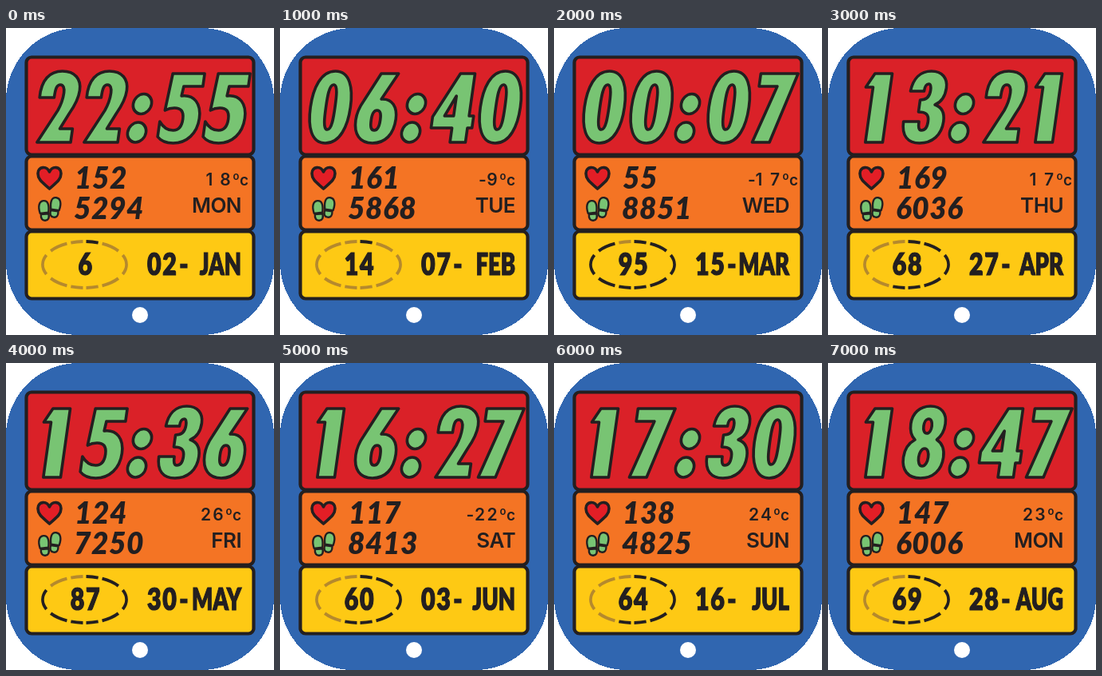
An HTML page that plays this animation: 336x384 px, repeating every 8000 ms.

```html
<!DOCTYPE html>
<html lang="en">
<head>
<meta charset="utf-8">
<title>Watch face</title>
<style>
  html, body { margin: 0; width: 100%; height: 100%; overflow: hidden; background: #fff; }
  svg { display: block; width: 336px; height: 384px; }
  .line { stroke: #231f20; stroke-width: 3.6; stroke-linejoin: round; }
  .panel { stroke-width: 4.2; }
  .green { fill: #78c473; }
  text { fill: #231f20; white-space: pre; }
  .count { font: italic 900 37px Lato, sans-serif; letter-spacing: .5px; }
  .date { font: 900 37px Lato, sans-serif; stroke: #231f20; stroke-width: 1.2; }
  .num { letter-spacing: 2px; }
  .day { font: 600 26px Inter, sans-serif; letter-spacing: -.6px; text-anchor: end; }
  .temp { font: 600 21px Inter, sans-serif; text-anchor: middle; }
  .ring { fill: none; stroke-width: 3.8; }
</style>
</head>
<body>
<svg viewBox="0 0 336 384" xmlns="http://www.w3.org/2000/svg">
  <rect width="336" height="384" rx="91" fill="#3066b0" shape-rendering="crispEdges"/>
  <g class="line panel">
    <rect x="25.5" y="36.5" width="285" height="122" rx="6.500" fill="#da2128"/>
    <rect x="25.5" y="160.5" width="285" height="92" rx="6.500" fill="#f47424"/>
    <rect x="25.5" y="254.5" width="285" height="84" rx="6.500" fill="#fec914"/>
  </g>

  <g id="clock" class="line green" fill-rule="evenodd">
    <ellipse rx="11.500" ry="12.500" transform="translate(171 95) skewX(-8)"/>
    <ellipse rx="11.500" ry="12.500" transform="translate(164 130.500) skewX(-8)"/>
  </g>

  <path class="line" fill="#e31e26"
    d="M54.500 201C47 194 40 190 40 182C40 173 51 172 54.500 180C58 172 69 173 69 182C69 190 62 194 54.500 201Z"/>
  <defs>
    <g id="foot">
      <path d="M-6 4C-8 -5 -6 -12 0 -12C7 -12 7 -4 5 4Z"/>
      <path d="M-5 5.500H5C6 11 4 14 0 14C-4 14 -6 11 -5 5.500Z"/>
    </g>
  </defs>
  <g class="line green" style="stroke-width:2.5">
    <use href="#foot" transform="translate(48 227.500) rotate(-6) scale(.95)"/>
    <use href="#foot" transform="translate(61.500 223.500) rotate(8) scale(-.95 .95)"/>
  </g>

  <text id="pulse" class="count" x="86" y="201"/>
  <text id="steps" class="count" x="85" y="239"/>

  <g id="temp" class="temp">
    <text id="minus" y="197">-</text>
    <text id="tens" y="197"/>
    <text id="ones" y="197"/>
    <g id="unit">
      <text x="-15.500" y="190" style="font-size:13px">o</text>
      <text x="-5.500" y="197" style="font-size:19px">c</text>
    </g>
  </g>
  <text id="day" class="day" x="295" y="231"/>

  <g id="rings"></g>
  <text id="level" class="date num" text-anchor="middle" transform="translate(100 309) scale(.82 1)"/>
  <text id="date" class="date num" transform="translate(177 309) scale(.82 1)"/>
  <text class="date" text-anchor="middle" transform="translate(223 309) scale(.82 1)">-</text>
  <text id="month" class="date" text-anchor="end" transform="translate(295 309) scale(.74 1)"/>

  <circle cx="168" cy="359" r="10" fill="#fff"/>
</svg>
<script>
const $ = id => document.getElementById(id);
const STEP = 1000;

// time, pulse, steps, temperature, right edge of temperature, day, battery, date, month
const states = [
  ['2255', 152, 5294, 18, 304, 'MON', 6, '02', 'JAN'],
  ['0640', 161, 5868, -9, 295, 'TUE', 14, '07', 'FEB'],
  ['0007', 55, 8851, -17, 306, 'WED', 95, '15', 'MAR'],
  ['1321', 169, 6036, 17, 306, 'THU', 68, '27', 'APR'],
  ['1536', 124, 7250, 26, 295, 'FRI', 87, '30', 'MAY'],
  ['1627', 117, 8413, -22, 295, 'SAT', 60, '03', 'JUN'],
  ['1730', 138, 4825, 24, 295, 'SUN', 64, '16', 'JUL'],
  ['1847', 147, 6006, 23, 295, 'MON', 69, '28', 'AUG']
];

// Upright digit outlines in a 44 x 88 cell
const digits = [
  'M22-1C38-1 44 20 44 44C44 68 38 89 22 89C6 89 0 68 0 44C0 20 6-1 22-1ZM22 16C17 16 17 32 17 44C17 56 17 72 22 72C27 72 27 56 27 44C27 32 27 16 22 16Z',
  'M32 2H13V2L5 19H13V88H32Z',
  'M6 88L24 48C27 40 28 32 28 26C28 20 26 16 23 16C19 16 18 20 18 32H2C1 10 9-1 23-1C37-1 45 9 45 23C45 34 42 42 37 52L29 71H43V88Z',
  'M3 24C4 8 11-1 23-1C35-1 42 8 42 20C42 31 38 38 32 41C40 44 44 51 44 62C44 79 35 89 21 89C8 89 0 80 0 62H17C17 69 18 73 21 73C25 73 27 69 27 62C27 53 23 50 15 50V35C22 35 25 31 25 23C25 18 24 15 22 15C19 15 18 18 18 24Z',
  'M23 2H39V55H44V70H39V88H22V70H-1V56ZM22 55V30L12 55Z',
  'M8 2H43V18H22L21 30C35 28 44 40 44 58C44 77 34 89 19 89C12 89 5 86 1 81V62C6 70 11 73 17 73C23 73 26 68 26 59C26 49 22 45 15 45C11 45 8 46 5 48Z',
  'M21 2H40L25 34C37 33 44 44 44 59C44 78 36 89 22 89C8 89 0 78 0 60C0 51 2 44 6 36ZM22 48C18 48 17 53 17 60C17 68 18 73 22 73C26 73 27 68 27 60C27 53 26 48 22 48Z',
  'M2 2H43L22 88H3L22 18H2Z',
  'M22-1C34-1 41 8 41 21C41 30 38 37 34 41C40 45 44 52 44 63C44 79 36 89 22 89C8 89 0 79 0 63C0 52 4 45 10 41C6 37 3 30 3 21C3 8 10-1 22-1ZM22 15C16 15 16 33 22 33C28 33 28 15 22 15ZM22 52C15 52 15 74 22 74C29 74 29 52 22 52Z'
];

function add(parent, tag, attrs) {
  const el = document.createElementNS('http://www.w3.org/2000/svg', tag);
  for (const key in attrs) el.setAttribute(key, attrs[key]);
  return parent.appendChild(el);
}

const slots = [32, 91, 188, 245].map(x => add($('clock'), 'path', {
  transform: `translate(${x} 143) skewX(-8) scale(1.14 1) translate(0 -88)`,
  'vector-effect': 'non-scaling-stroke'
}));

// Point of the battery ring in the direction of an angle, clockwise from the top
function ringPoint(degrees) {
  const a = degrees * Math.PI / 180;
  const r = 1 / Math.hypot(Math.sin(a) / 52.5, Math.cos(a) / 29);
  return `${98.5 + r * Math.sin(a)} ${296 - r * Math.cos(a)}`;
}

const dashes = Array.from({ length: 10 }, (_, i) => add($('rings'), 'path', {
  class: 'ring',
  d: `M${ringPoint(i * 36 + 4)}A52.5 29 0 0 1 ${ringPoint(i * 36 + 32)}`
}));

function setTemp(value, end) {
  const text = String(Math.abs(value)).padStart(2, ' ');
  const narrow = text[0] === '1';
  const ones = end - 29;
  const tens = ones - (narrow ? 20 : 15.5);
  const minus = text[0] === ' ' ? ones - 12 : tens - (narrow ? 9 : 12);
  $('ones').setAttribute('x', ones);
  $('tens').setAttribute('x', tens);
  $('minus').setAttribute('x', minus);
  $('ones').textContent = text[1];
  $('tens').textContent = text[0];
  $('minus').style.display = value < 0 ? '' : 'none';
  $('unit').setAttribute('transform', `translate(${end} 0)`);
}

function show([time, pulse, steps, temp, end, day, level, date, month]) {
  slots.forEach((slot, i) => slot.setAttribute('d', digits[time[i]]));
  setTemp(temp, end);
  const lit = Math.max(1, Math.floor(level / 10));
  dashes.forEach((dash, i) => dash.setAttribute('stroke', i < lit ? '#231f20' : '#b5892d'));
  const labels = { pulse, steps, day, level, date, month };
  for (const id in labels) $(id).textContent = labels[id];
}

let current = -1;
function tick() {
  const i = Math.floor(performance.now() / STEP) % states.length;
  if (i !== current) show(states[current = i]);
  requestAnimationFrame(tick);
}
tick();
</script>
</body>
</html>
```
